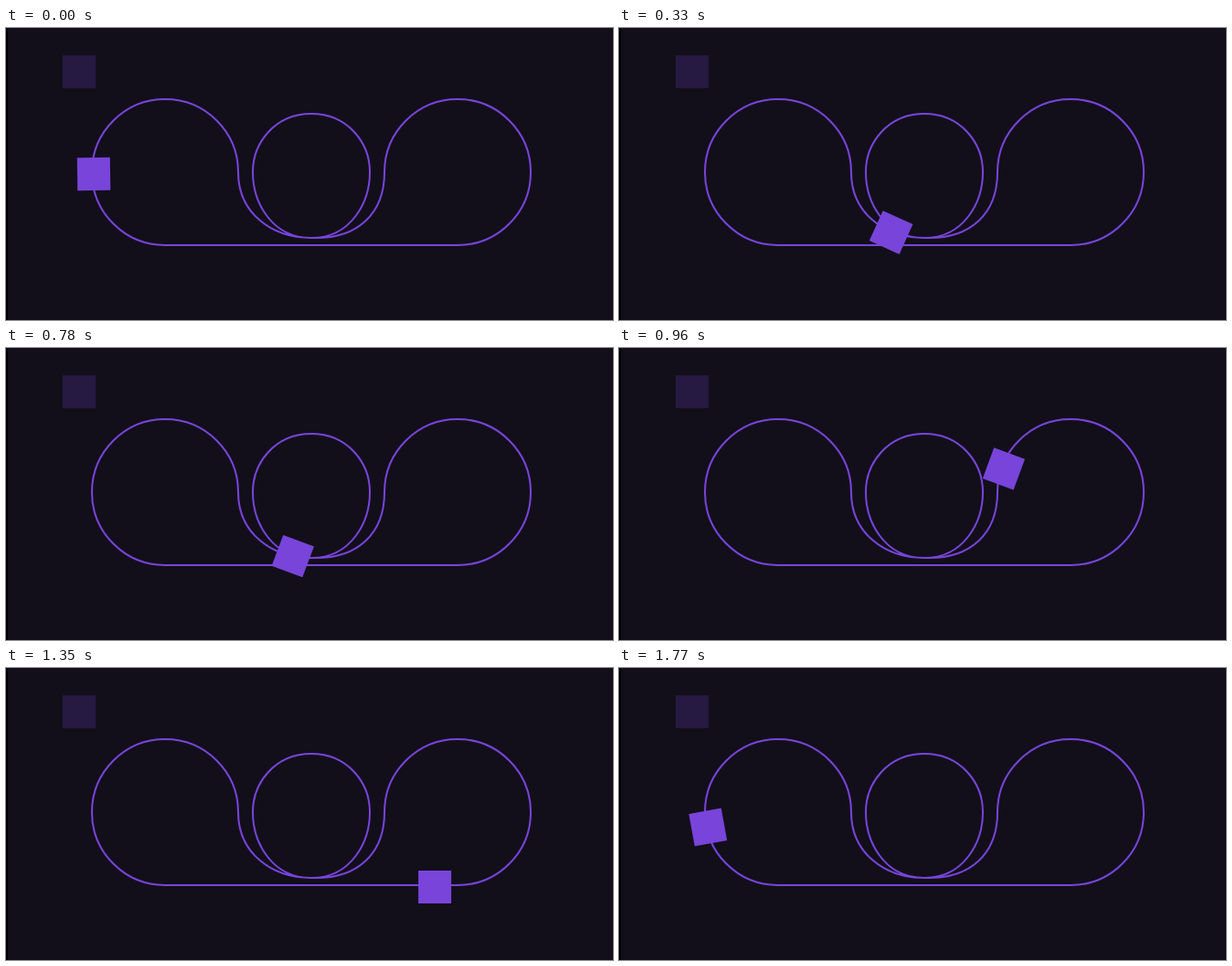
Animation, 664 px wide and 320 px high, one loop 1800 ms. Source, as an HTML page:

```html
<!DOCTYPE html>
<html lang="en">
<head>
<meta charset="utf-8">
<title>Motion path</title>
<style>
  :root {
    --violet: #7944da;
    --track: path("M8 56C8 33.90861 25.90861 16 48 16C70.09139 16 88 33.90861 88 56C88 78.09139 105.90861 92 128 92C150.09139 92 160 72 160 56C160 40 148 24 128 24C108 24 96 40 96 56C96 72 105.90861 92 128 92C154 93 168 78 168 56C168 33.90861 185.90861 16 208 16C230.09139 16 248 33.90861 248 56C248 78.09139 230.09139 96 208 96L48 96C25.90861 96 8 78.09139 8 56Z");
  }
  html, body {
    margin: 0;
    width: 100%;
    height: 100%;
    overflow: hidden;
    background: #120f1b;
  }
  body {
    position: relative;
    box-sizing: border-box;
    border-left: 2px solid #000;
  }
  .scene {
    position: absolute;
    left: 76px;
    top: 46px;
    width: 256px;
    height: 112px;
    transform: scale(2);
    transform-origin: 0 0;
  }
  svg {
    position: absolute;
    left: 0;
    top: 0;
    overflow: visible;
  }
  svg path {
    d: var(--track);
    fill: none;
    stroke: var(--violet);
    stroke-width: 1;
  }
  .rider {
    position: absolute;
    left: 1px;
    top: 1px;
    width: 256px;
    height: 112px;
  }
  .box {
    position: absolute;
    width: 18px;
    height: 18px;
    background: var(--violet);
  }
  .ghost {
    left: -9px;
    top: -9px;
    opacity: .2;
  }
  .moving {
    left: 0;
    top: 0;
    offset-path: var(--track);
    offset-anchor: center;
    animation: ride 1800ms -2ms infinite;
  }
  /* One rest at the end of the lap, then 59 even steps of 30 ms */
  @keyframes ride {
    0% {
      offset-distance: 100%;
      offset-rotate: auto -.7deg;
      animation-timing-function: step-end;
    }
    1.66667% {
      offset-distance: 2.5%;
      offset-rotate: auto 0deg;
      animation-timing-function: steps(59, end);
    }
    100% {
      offset-distance: 100.8333%;
      offset-rotate: auto 0deg;
    }
  }
</style>
</head>
<body>
<div class="scene">
  <svg width="256" height="112" viewBox="0 0 256 112"><path/></svg>
  <div class="rider">
    <div class="box ghost"></div>
    <div class="box moving"></div>
  </div>
</div>
</body>
</html>
```
